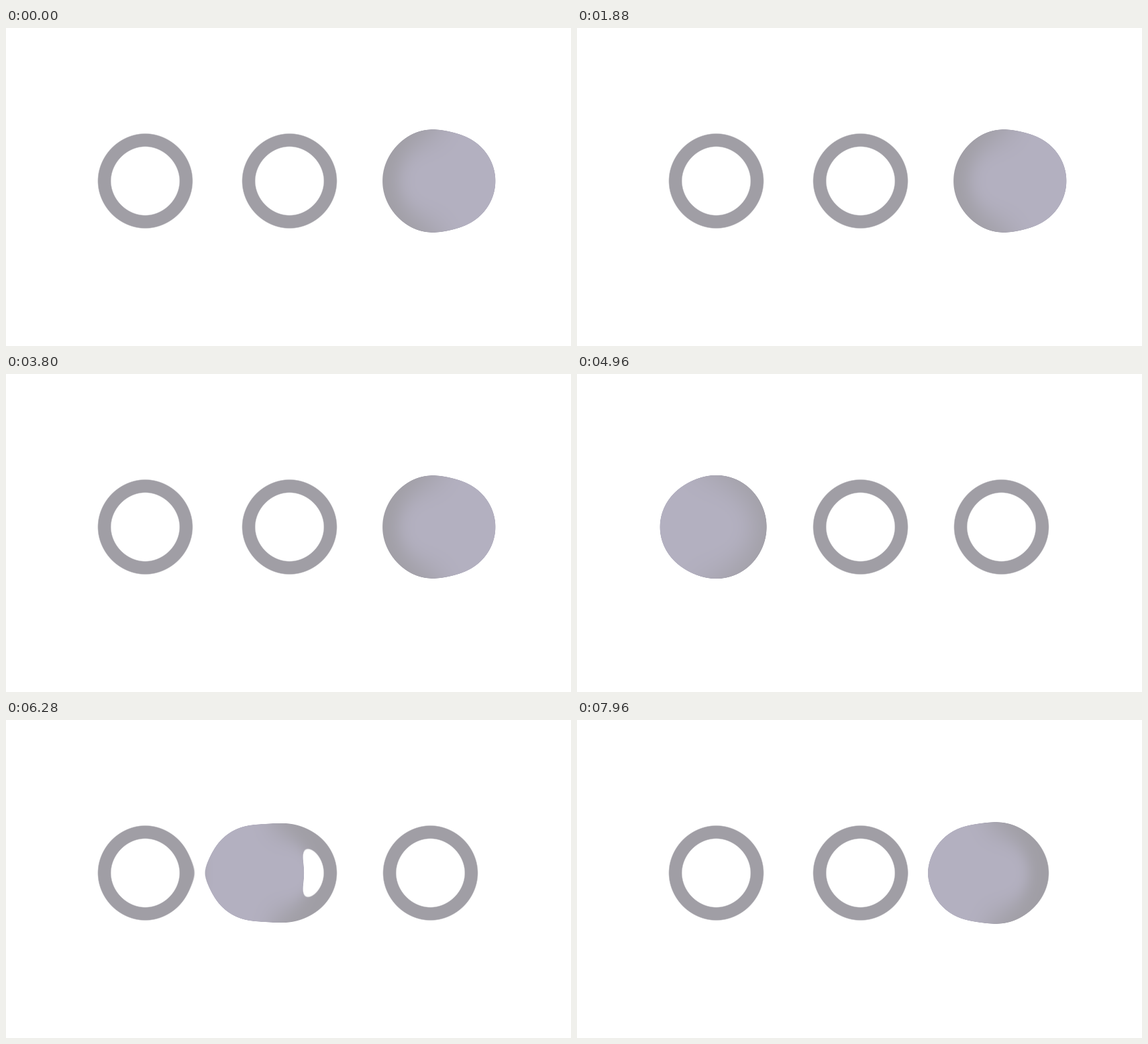
Write an HTML page with a canvas that moves like this. It is 842x474 px and loops after 8000 ms.

```html
<!DOCTYPE html>
<html lang="en">
<head>
<meta charset="utf-8">
<title>Gooey loader</title>
<style>
  html, body { margin: 0; width: 100%; height: 100%; overflow: hidden; background: #fff; }
  canvas { display: block; width: 842px; height: 474px; }
</style>
</head>
<body>
<canvas id="stage" width="842" height="474"></canvas>
<script>
const ctx = document.getElementById('stage').getContext('2d');

// Working area: the shapes plus room for the blur.
const X0 = 60, Y0 = 110, W = 724, H = 236;
const CY = 228;
const RINGS = [207.5, 422.5, 632.5];
const RING_R = 62.85, RING_HALF = 6.43, BALL_R = 63.7;
const RIGHT = 658, LEFT = 176;
const RING_RGB = [160, 158, 165], BALL_RGB = [179, 176, 192];
const BOXES = [15, 15, 14];
const LEVEL = 0.274, CONTRAST = 80;

const LOOP = 8000, STEP = 40, CYCLE = 48, TURN = 24, END = 47;

const ringBase = new Float32Array(W * H);
const ring = new Float32Array(W * H);
const ball = new Float32Array(W * H);
const temp = new Float32Array(W * H);
const image = ctx.createImageData(W, H);

const clamp = v => Math.min(1, Math.max(0, v));

function eachPixel(fn) {
  for (let y = 0, i = 0; y < H; y++)
    for (let x = 0; x < W; x++, i++) fn(i, x + X0 + 0.5, y + Y0 + 0.5 - CY);
}

eachPixel((i, x, dy) => {
  for (const cx of RINGS) {
    const d = Math.abs(Math.hypot(x - cx, dy) - RING_R) - RING_HALF;
    ringBase[i] = Math.max(ringBase[i], clamp(0.5 - d));
  }
});

// Running-sum box blur along one axis.
function box(src, dst, lines, lineStep, n, step, r) {
  const k = 1 / (2 * r + 1);
  for (let l = 0; l < lines; l++) {
    const o = l * lineStep;
    let sum = 0;
    for (let j = 0; j < r; j++) sum += src[o + j * step];
    for (let j = 0; j < n; j++) {
      if (j + r < n) sum += src[o + (j + r) * step];
      if (j > r) sum -= src[o + (j - r - 1) * step];
      dst[o + j * step] = sum * k;
    }
  }
}

function blur(buf) {
  for (const r of BOXES) {
    box(buf, temp, H, W, W, 1, r);
    box(temp, buf, W, 1, H, W, r);
  }
}

// Symmetric cubic Bezier ease with handles of length q.
function ease(p, q = 0.56) {
  let lo = 0, hi = 1, s = 0.5;
  for (let n = 0; n < 30; n++) {
    s = (lo + hi) / 2;
    const x = 3 * q * s * (1 - s) ** 2 + 3 * (1 - q) * s * s * (1 - s) + s ** 3;
    if (x < p) lo = s; else hi = s;
  }
  return s * s * (3 - 2 * s);
}

function ballX(step) {
  const away = step <= TURN
    ? ease(step / TURN)
    : 1 - ease((step - TURN) / (END - TURN));
  return RIGHT + (LEFT - RIGHT) * away;
}

function draw(step) {
  const cx = ballX(step);
  eachPixel((i, x, dy) => {
    const b = clamp(0.5 + BALL_R - Math.sqrt((x - cx) ** 2 + dy * dy));
    ball[i] = b;
    ring[i] = ringBase[i] * (1 - b);
  });
  blur(ring);
  blur(ball);

  const px = image.data;
  for (let i = 0, o = 0; i < W * H; i++, o += 4) {
    const sum = ring[i] + ball[i];
    const a = clamp((sum - LEVEL) * CONTRAST + 0.5);
    const m = a > 0 ? clamp(ball[i] / sum) : 0;
    for (let c = 0; c < 3; c++) {
      const tone = RING_RGB[c] + (BALL_RGB[c] - RING_RGB[c]) * m;
      px[o + c] = 255 + (tone - 255) * a;
    }
    px[o + 3] = 255;
  }
  ctx.putImageData(image, X0, Y0);
}

ctx.fillStyle = '#fff';
ctx.fillRect(0, 0, 842, 474);

const start = performance.now();
let shown = -1;

function tick() {
  const t = (performance.now() - start) % LOOP;
  const step = Math.floor((t + 0.5) / STEP) % (LOOP / STEP) % CYCLE;
  if (step !== shown) draw(shown = step);
  requestAnimationFrame(tick);
}
tick();
</script>
</body>
</html>
```
